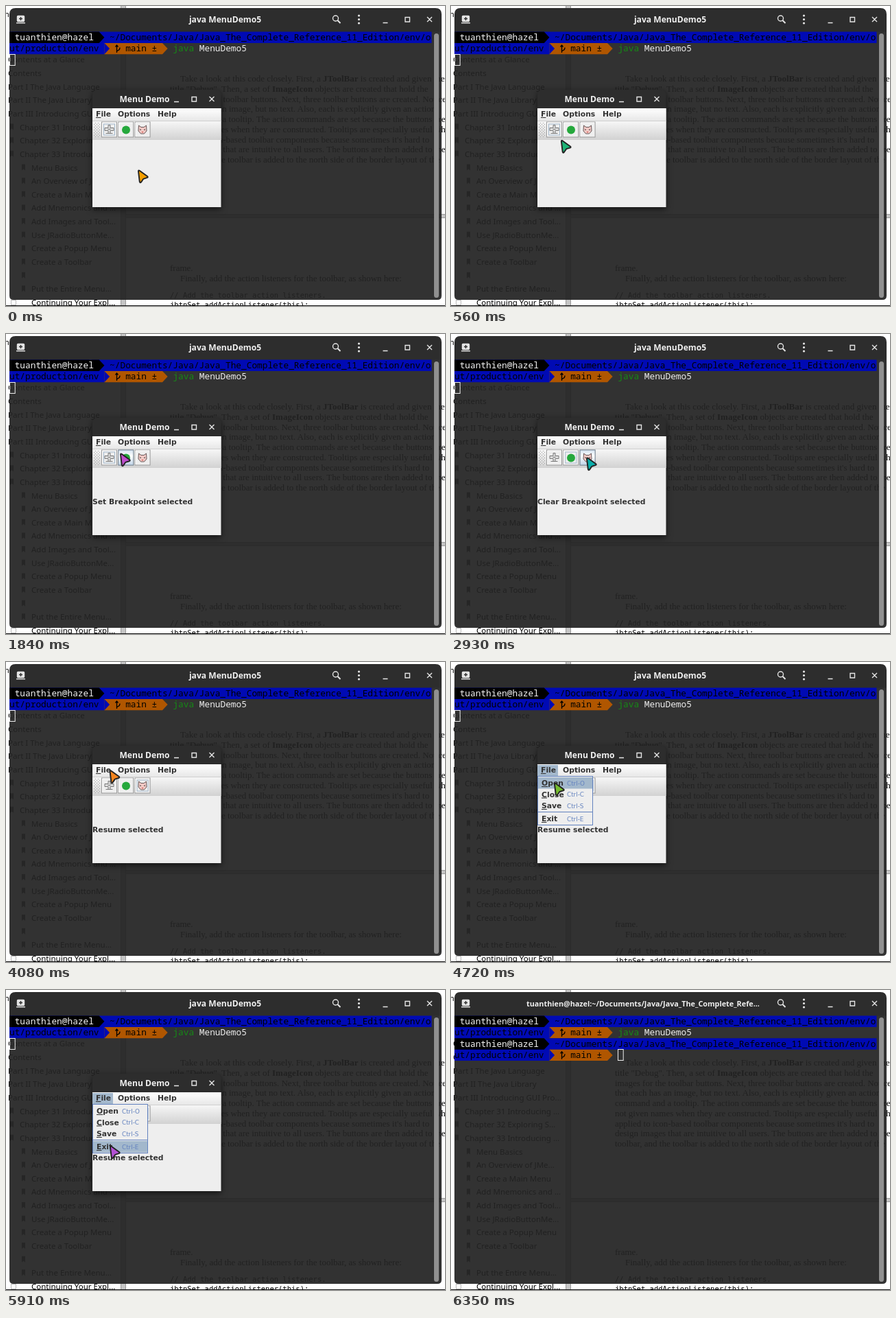
An HTML page for the animation above (6420 ms loop, 640 px wide and 437 px high).

```html
<!DOCTYPE html>
<html lang="en">
<head>
<meta charset="utf-8">
<title>Menu demo</title>
<style>
  html, body { margin: 0; width: 100%; height: 100%; overflow: hidden; background: #fff; }
  svg { display: block; width: 640px; height: 437px; }
  text { white-space: pre; }
  .side { font: 11.5px "Noto Sans", sans-serif; }
  .book { font: 13px "Liberation Serif", serif; }
  .code { font: 10.5px "DejaVu Sans Mono", monospace; }
  .term { font: 12.816px "Noto Sans Mono", monospace; }
  .title { font: bold 12.1px "Open Sans", sans-serif; fill: #f0f0f0; text-anchor: middle; }
  .title.long { font-size: 10.8px; }
  .swing { font: bold 10.8px "DejaVu Sans", sans-serif; fill: #333; }
  .keys { font: 8.8px "DejaVu Sans", sans-serif; fill: #6382bf; }
  .key { text-decoration: underline; }
  .line { fill: none; stroke: #e4e4e4; stroke-width: 1.4; }
  .pick { fill: #a3b8cc; }
  #app { filter: drop-shadow(0 3px 5px rgba(0, 0, 0, .6)); }
</style>
</head>
<body>
<svg viewBox="0 0 640 437">
  <defs>
    <linearGradient id="bar" x2="0" y2="1">
      <stop offset="0" stop-color="#fff"/><stop offset="1" stop-color="#e6e6e6"/>
    </linearGradient>
    <linearGradient id="tools" x2="0" y2="1">
      <stop offset="0" stop-color="#f6f6f6"/><stop offset="1" stop-color="#d2d2d2"/>
    </linearGradient>
    <linearGradient id="glow" x2="0" y2="1">
      <stop offset="0" stop-color="#d5e3f1"/><stop offset=".4" stop-color="#fff"/><stop offset="1" stop-color="#c0d4e8"/>
    </linearGradient>
    <pattern id="grip" width="4" height="4" patternUnits="userSpaceOnUse">
      <path d="M0 0h1v1h-1zM2 2h1v1h-1z" fill="#a4a4a4"/>
    </pattern>
    <g id="button">
      <rect x=".5" y=".5" width="22" height="22" fill="#efefef" stroke="#999"/>
      <path d="M1.5 21.5V1.5H21.5" fill="none" stroke="#fff"/>
    </g>
    <rect id="hover" x=".5" y=".5" width="22" height="22" fill="url(#glow)" stroke="#7a8a99"/>
    <rect id="focus" x="3.5" y="3.5" width="16" height="16" fill="none" stroke="#a3b8cc"/>
    <g id="prompt" class="term">
      <path d="M5 37.5H620.5V53.9H143.5V70.3H5z" fill="#000ab4"/>
      <path d="M5 37.5H135.7l7.7 8.2-7.7 8.2H5z"/>
      <path d="M143.400 53.9H228l7.7 8.2-7.7 8.2h-84.6z" fill="#b05600"/>
      <path d="M143.400 53.9l7.7 8.2-7.7 8.2z" fill="#000ab4"/>
      <text x="12.7" y="50" fill="#f4f4f4">tuanthien@hazel</text>
      <text x="151.1" y="50">~/Documents/Java/Java_The_Complete_Reference_11_Edition/env/o</text>
      <text x="5" y="66.4">ut/production/env</text>
      <text x="174.2" y="66.4">main ±</text>
      <path d="M161.5 68V57m-2 2.5l2-2.5 2 2.5M161.500 65.5q4.5-1 4.5-5" fill="none" stroke="#000" stroke-width="1.3"/>
    </g>
    <rect id="caret" x=".5" y=".5" width="7.7" height="16" fill="none" stroke="#eee"/>
  </defs>

  <path d="M0 0H640V437H0z" fill="#fff"/>
  <path d="M167 0h8V437h-8zM175 303H640v6H175z" fill="#c6c6c6"/>
  <path d="M167.5 0V437M174.5 0V437M175 303.5H640M175 308.5H640" stroke="#999"/>
  <g id="page"></g>
  <path d="M7.500 428.5h7v7h-7z" fill="none" stroke="#777" stroke-dasharray="1 1"/>

  <!-- terminal -->
  <path d="M5 37H635V422q0 6-6 6H11q-6 0-6-6z" fill="#232323" fill-opacity=".93"/>
  <path d="M5 37.5V12q0-9 9-9H626q9 0 9 9V37.5z" fill="#2d2d2d"/>
  <rect x="624" y="40" width="7" height="385" rx="3.5" fill="#909090"/>
  <g class="line">
    <rect x="16.5" y="14.5" width="10" height="8" rx="1" fill="#e4e4e4"/>
    <path d="M15 24.7H28"/>
    <path d="M21.5 16v5M19 18.5h5" stroke="#2d2d2d"/>
    <circle cx="480.5" cy="18" r="4"/>
    <path d="M483.5 21l4 4" stroke-width="2"/>
    <path d="M549.5 24.5h7M582 16.500h6.5v6.5h-6.5zM614 16l7 7m0-7l-7 7"/>
  </g>
  <path d="M514.5 14v.01M514.5 19.5v.01M514.5 25v.01" stroke="#e4e4e4" stroke-width="3.2" stroke-linecap="round"/>
  <text id="running" class="title" x="319.5" y="24">java MenuDemo5</text>
  <text id="idle" class="title long" x="280" y="24">tuanthien@hazel:~/Documents/Java/Java_The_Complete_Refe...</text>
  <use href="#prompt"/>
  <text class="term" x="243.4" y="66.4" fill="#168a16">java <tspan fill="#eee">MenuDemo5</tspan></text>
  <use id="wait" href="#caret" x="5" y="70"/>
  <g id="done">
    <use href="#prompt" y="32.8"/>
    <use href="#caret" x="243" y="86"/>
  </g>

  <!-- application -->
  <g id="app">
    <path d="M126 149.500V130q0-8 8-8H305.500q8 0 8 8V149.500z" fill="#2d2d2d"/>
    <text class="title" x="202" y="140">Menu Demo</text>
    <path class="line" d="M245 139.500h7M271 132.500h6.500v6.500h-6.500zM296.500 132l7 7m0-7l-7 7"/>
    <path d="M126 149H313.500V293H126z" fill="#eee"/>
    <path d="M126 149H313.500V168H126z" fill="url(#bar)"/>
    <path d="M126 168H313.500V195H126z" fill="url(#tools)"/>
    <path d="M126 167.500H313.500M126 194.500H313.500" stroke="#d0d0d0"/>
    <rect x="128" y="169" width="9" height="23" fill="url(#grip)"/>
    <rect id="open" class="pick" x="126" y="150" width="30" height="16"/>
    <g class="swing">
      <text x="131" y="161"><tspan class="key">F</tspan>ile</text>
      <text x="163" y="161">Options</text>
      <text x="221" y="161">Help</text>
      <text id="set" x="126" y="247.5">Set Breakpoint selected</text>
      <text id="clear" x="126" y="247.5">Clear Breakpoint selected</text>
      <text id="resume" x="126" y="247.5">Resume selected</text>
    </g>
    <g id="buttons"></g>
    <g transform="translate(150.5 180)" fill="#ddd" stroke="#777">
      <path d="M-1.5-6.500h3v4h5v4h-5v4h-3v-4h-5v-4h5z"/>
      <path d="M-5 5.500h10M-2-.5h4" fill="none"/>
    </g>
    <circle cx="175" cy="180.5" r="6" fill="#25a83c"/>
    <g transform="translate(199 180)">
      <path d="M-5.500-6l3.500 2.500h4L5.500-6 6 2 2.500 6h-5L-6 2z" fill="#f1c9c5" stroke="#655"/>
      <path d="M-3-.5v1.500M3-.5v1.500" stroke="#333" stroke-width="1.3"/>
      <path d="M-1.500 3h3l-1.500 1.500z" fill="#d0453c"/>
    </g>
    <g id="menu">
      <rect x="126.5" y="166.5" width="80" height="71" fill="#eee" stroke="#6382bf"/>
      <g id="items"></g>
      <path d="M127 218.500H206" stroke="#6382bf"/>
    </g>
  </g>

  <path id="mouse" d="M1 1.800Q.8-.2 2.600.8L14 9q1.700 1.500-.5 2.200L8.300 12.800 5 17.600q-1.600 1.800-2.200-.5z"
    stroke="#222" stroke-width="1.9" stroke-linejoin="round"/>
  <path d="M0 436H640v1H0z" fill="#111"/>
</svg>

<script>
const LOOP = 6420, EXIT = 6050;
const $ = id => document.getElementById(id);
const add = (id, markup) => $(id).insertAdjacentHTML('beforeend', markup);
const line = (kind, x, y, text) => add('page', `<text class="${kind}" x="${x}" y="${y}">${text}</text>`);

// page behind the terminal
const outline = ['Contents at a Glance', 'Contents', 'Part I The Java Language', 'Part II The Java Library',
  'Part III Introducing GUI Pro...', 'Chapter 31 Introducing ...', 'Chapter 32 Exploring S...',
  'Chapter 33 Introducing ...', 'Menu Basics', 'An Overview of JMe...', 'Create a Main Menu',
  'Add Mnemonics and ...', 'Add Images and Tool...', 'Use JRadioButtonMe...', 'Create a Popup Menu',
  'Create a Toolbar', '', 'Put the Entire Menu...', 'Continuing Your Expl...'];
outline.forEach((text, i) => {
  const depth = i < 5 ? 0 : i < 8 ? 1 : 2, y = 82.3 + i * 19.65;
  line('side', 3 + depth * 17, y, text);
  if (depth && i < 18) add('page', `<path d="M${depth * 17 - 11} ${y - 9}h5v9l-2.5-2-2.5 2z" fill="#555"/>`);
});
const prose = ['Take a look at this code closely. First, a <tspan font-weight="bold">JToolBar</tspan> is created and given the',
  'title "Debug". Then, a set of <tspan font-weight="bold">ImageIcon</tspan> objects are created that hold the',
  'images for the toolbar buttons. Next, three toolbar buttons are created. Notice',
  'that each has an image, but no text. Also, each is explicitly given an action',
  'command and a tooltip. The action commands are set because the buttons are',
  'not given names when they are constructed. Tooltips are especially useful when',
  'applied to icon-based toolbar components because sometimes it\'s hard to',
  'design images that are intuitive to all users. The buttons are then added to the',
  'toolbar, and the toolbar is added to the north side of the border layout of the'];
prose.forEach((text, i) => line('book', i ? 239 : 254, 110 + i * 14.75, text));
line('book', 239, 386, 'frame.');
line('book', 254, 401, 'Finally, add the action listeners for the toolbar, as shown here:');
line('code', 239, 425, '// Add the toolbar action listeners.');
line('code', 239, 439, 'jbtnSet.addActionListener(this);');
line('side', -6, 16, 'm');

// parts that are visible only between two times
const shown = [];
const show = (id, from, to) => shown.push({ el: $(id), from, to });

// toolbar: [hover from, hover to, focus from, focus to]
[[700, 1650, 0, 2120], [1680, 2500, 2120, 3120], [2600, 3600, 3120, LOOP]].forEach(([h0, h1, f0, f1], i) => {
  const at = `x="${139 + i * 24.3}" y="168.5"`;
  add('buttons', `<use href="#button" ${at}/><use id="hover${i}" href="#hover" ${at}/><use id="focus${i}" href="#focus" ${at}/>`);
  show('hover' + i, h0, h1);
  show('focus' + i, f0, f1);
});

// menu: [name, row top, selected from, selected to]
[['Open', 168, 4620, 4880], ['Close', 184.5, 4880, 5120], ['Save', 201, 5120, 5560], ['Exit', 220, 5560, EXIT]]
  .forEach(([name, y, from, to]) => {
    add('items', `<rect id="${name}" class="pick" x="127" y="${y}" width="79" height="16.5"/>
      <text class="swing" x="132" y="${y + 12}"><tspan class="key">${name[0]}</tspan>${name.slice(1)}</text>
      <text class="keys" x="169" y="${y + 11.5}">Ctrl-${name[0]}</text>`);
    show(name, from, to);
  });

show('set', 1000, 2120);
show('clear', 2120, 3120);
show('resume', 3120, EXIT);
show('open', 4350, EXIT);
show('menu', 4350, EXIT);
for (const id of ['running', 'wait', 'app', 'mouse']) show(id, 0, EXIT);
for (const id of ['idle', 'done']) show(id, EXIT, LOOP);

// pointer: [time, x, y]
const path = [[0, 192, 239], [150, 192, 239], [750, 150, 182], [1000, 148, 180], [1450, 148, 180],
  [1800, 166, 174], [2250, 167, 175], [2750, 197, 180], [3400, 197, 180], [3950, 151, 158],
  [4400, 149, 157], [4700, 150, 176], [5000, 150, 192], [5200, 150, 208], [5450, 150, 208],
  [5650, 151, 227], [LOOP, 151, 227]];
const ease = p => p * p * (3 - 2 * p);
function pointerAt(t) {
  const i = path.findIndex(([end]) => end > t);
  const [t0, x0, y0] = path[i - 1], [t1, x1, y1] = path[i];
  const p = ease((t - t0) / (t1 - t0));
  return `translate(${x0 + (x1 - x0) * p} ${y0 + (y1 - y0) * p})`;
}

// pointer runs through the colour wheel
const wheel = [[245, 160, 0], [239, 74, 92], [196, 74, 196], [154, 94, 232],
  [47, 128, 245], [8, 176, 168], [47, 184, 76], [154, 192, 32]];
function tintAt(t) {
  const turn = t / 101.2, i = Math.floor(turn), next = wheel[(i + 1) % 8];
  return `rgb(${wheel[i % 8].map((c, k) => Math.round(c + (next[k] - c) * (turn - i)))})`;
}

function render(t) {
  for (const { el, from, to } of shown) el.style.display = t >= from && t < to ? '' : 'none';
  $('mouse').setAttribute('transform', pointerAt(t));
  $('mouse').setAttribute('fill', tintAt(t));
}

const start = performance.now();
function tick() {
  render((performance.now() - start) % LOOP);
  requestAnimationFrame(tick);
}
tick();
</script>
</body>
</html>
```
